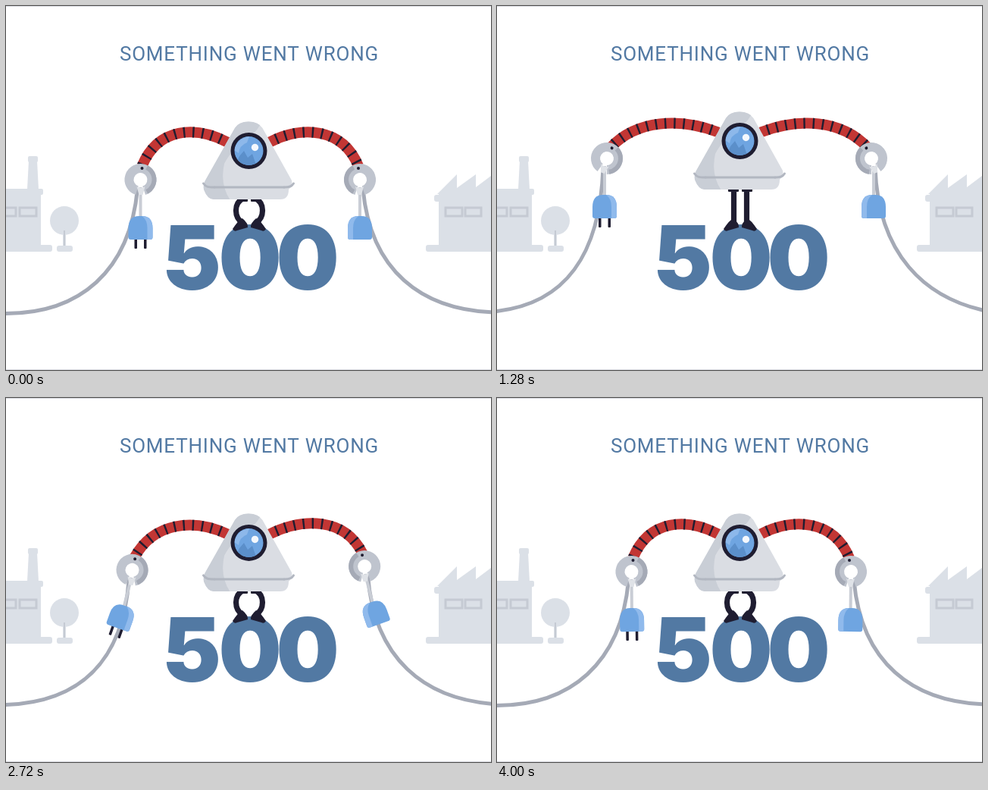
An HTML page with a canvas for the animation above (4080 ms loop, 640 by 480 pixels).

```html
<!DOCTYPE html>
<html lang="en">
<head>
<meta charset="utf-8">
<title>Something went wrong</title>
<style>
html, body { margin: 0; width: 100%; height: 100%; overflow: hidden; background: #fff; }
canvas { display: block; width: 640px; height: 480px; }
</style>
</head>
<body>
<canvas id="stage" width="640" height="480" role="img" aria-label="Something went wrong, 500"></canvas>
<script>
const ctx = document.getElementById('stage').getContext('2d');
const LOOP = 4080, STEP = 80;
const INK = '#1f1d31', BLUE = '#5279a3', RED = '#c23634', HAZE = '#dbe0e7';
const LIGHT = '#dadde3', SHADE = '#c9ced6', STEEL = '#bfc4ce', DEEP = '#a5aab6';
const PLUG = '#6fa5e1', PLUG_LIGHT = '#90baec';

const lerp = (a, b, p) => a + (b - a) * p;
const ease = u => (1 - Math.cos(Math.PI * u)) / 2;

// Eased value at time t from [time, value] pairs.
function track(t, keys) {
  for (let i = 1; i < keys.length; i++) {
    const [t0, a] = keys[i - 1], [t1, b] = keys[i];
    if (t < t1) return lerp(a, b, ease((t - t0) / (t1 - t0)));
  }
  return keys[keys.length - 1][1];
}

const pulse = (t, up, start, end) => track(t, [[0, 0], [up, 1], [start, 1], [end, 0]]);

const swing = t => track(t, [
  [0, 0], [480, -15], [640, -13], [960, 4], [1280, 0], [1520, -1.5], [1800, 0.5],
  [2080, 0], [2400, 6.5], [2640, 15], [2720, 14.5], [3100, -6], [3360, -2.8], [3620, 2], [4000, -0.6], [4080, 0]
]) * Math.PI / 180;

function fill(color, d) {
  ctx.fillStyle = color;
  ctx.fill(new Path2D(d));
}

function box(color, x, y, w, h, r = 0) {
  ctx.fillStyle = color;
  ctx.beginPath();
  ctx.roundRect(x, y, w, h, r);
  ctx.fill();
}

function disc(color, x, y, r) {
  ctx.fillStyle = color;
  ctx.beginPath();
  ctx.arc(x, y, r, 0, 7);
  ctx.fill();
}

function curve(color, width, p0, p1, p2, p3) {
  ctx.strokeStyle = color;
  ctx.lineWidth = width;
  ctx.beginPath();
  ctx.moveTo(...p0);
  ctx.bezierCurveTo(...p1, ...p2, ...p3);
  ctx.stroke();
}

function frameRect(x, y, w, h) {
  ctx.strokeStyle = '#c5cad3';
  ctx.lineWidth = 3;
  ctx.strokeRect(x, y, w, h);
}

function scenery() {
  box('#fff', 0, 0, 640, 480);
  box('#d9dbe1', 0, 0, 640, 1);
  box('#d9dbe1', 0, 479, 640, 1);

  box(HAZE, 29, 198, 13, 8, 2);
  fill(HAZE, 'M30 204H41L43 242H28Z');
  box(HAZE, -4, 241, 53, 8, 2);
  box(HAZE, 0, 245, 46, 78);
  box(HAZE, -4, 315, 65, 9, 3);
  frameRect(-6, 266, 19, 11);
  frameRect(18, 266, 22, 11);
  disc(HAZE, 77, 283, 19);
  box(HAZE, 75, 290, 4, 28);
  box(HAZE, 67, 316, 21, 8, 3);
  box('#c5cad3', 76, 296, 2, 20);

  fill(HAZE, 'M569 248L595 222V240L620 222V239L640 224V324H571V248Z');
  box(HAZE, 565, 249, 12, 9, 3);
  box(HAZE, 554, 315, 90, 9, 3);
  frameRect(580, 266, 22, 11);
  frameRect(606, 266, 21, 11);
}

function lettering() {
  ctx.fillStyle = BLUE;
  ctx.textAlign = 'center';
  ctx.font = '400 26px Roboto, sans-serif';
  ctx.letterSpacing = '0.8px';
  ctx.fillText('SOMETHING WENT WRONG', 321, 71.5);
  ctx.letterSpacing = '0px';
  ctx.font = '900 117px Inter, sans-serif';
  [...'500'].forEach((c, i) => ctx.fillText(c, 246 + i * 76, 373.5));
}

// side: -1 for the left arm, 1 for the right one.
function hand(side, x, y, p) {
  ctx.save();
  ctx.translate(x, y);
  ctx.scale(-side, 1);
  ctx.rotate(p * 0.32);
  ctx.lineCap = 'butt';
  ctx.lineWidth = 12;
  ctx.strokeStyle = STEEL;
  ctx.beginPath();
  ctx.arc(0, 0, 15, Math.PI * 0.6, Math.PI * 2.4);
  ctx.stroke();
  ctx.strokeStyle = DEEP;
  ctx.lineWidth = 6;
  ctx.beginPath();
  ctx.arc(0, 0, 18, -1.1, 1.1);
  ctx.stroke();
  fill('#dfe2e7', 'M-5 9L-2 20H3L6 9Q0 13 -5 9Z');
  disc(INK, 2, -15, 2);
  ctx.restore();
}

function plug(side, x, y, angle) {
  ctx.save();
  ctx.translate(x, y);
  ctx.rotate(angle);
  ctx.strokeStyle = '#c9cdd5';
  ctx.lineWidth = 4;
  ctx.beginPath();
  ctx.moveTo(0, 0);
  ctx.lineTo(0, 42);
  ctx.stroke();
  // The shell tips a little further than its cord.
  ctx.translate(0, 54);
  ctx.rotate(angle * 0.35);
  if (side < 0) {
    box(INK, -8, 12, 3.5, 15, 1);
    box(INK, 4.5, 12, 3.5, 15, 1);
  }
  ctx.scale(-side, 1);
  const shell = new Path2D('M-16 12V0Q-16 -16 -2 -16H2Q16 -16 16 0V12Q16 15 13 15H-13Q-16 15 -16 12Z');
  ctx.fillStyle = PLUG;
  ctx.fill(shell);
  ctx.clip(shell);
  fill(PLUG_LIGHT, 'M2 -16Q9 -11 9 0V15H17V-16Z');
  ctx.restore();
}

function cable(side, x, y, p) {
  const sx = x + side * lerp(4, 5, p), sy = y + 12;
  const left = side < 0;
  const bend = left ? lerp(98, 91, p) : lerp(548, 565, p);
  const sag = left ? lerp(407, 394, p) : lerp(401, 385, p);
  const end = left ? [-5, lerp(405.5, 403, p)] : [645, lerp(404, 402, p)];
  curve(DEEP, 5, [sx, sy], [sx + side * lerp(10, 4, p), sy + lerp(108, 115, p)], [bend, sag], end);
}

function arm(side, x, y, p, lift) {
  const a = [side < 0 ? 292 : 348, 179.5 - lift];
  const d = [x - side * lerp(2, 5.5, p), y - lerp(18, 15, p)];
  const b = [a[0] + side * lerp(42, 51, p), a[1] - lerp(22, 19.5, p)];
  const c = [d[0] - side * lerp(21, 34, p), d[1] - lerp(51, 36, p)];
  ctx.lineCap = 'butt';
  curve(RED, 14, a, b, c, d);
  ctx.setLineDash([2.4, 9.8]);
  ctx.lineDashOffset = -9;
  curve(INK, 14, a, b, c, d);
  ctx.setLineDash([]);
}

function limb(side, x, y, p, angle, lift) {
  cable(side, x, y, p);
  arm(side, x, y, p, lift);
  plug(side, x + side * 3 * p, y + 10, angle);
  hand(side, x, y, p);
}

function legs(lift, stand) {
  for (const side of [-1, 1]) {
    ctx.save();
    ctx.translate(321, 0);
    ctx.scale(side, 1);
    const out = 8.5 + 12 * (1 - stand), top = 254 - lift;
    ctx.lineCap = 'butt';
    curve(INK, 7.2, [8.5, top], [out, top + 6], [out, 279], [8.5, 286]);
    box(INK, 2, top, 14, 4, 1);
    fill(INK, 'M9 280Q14 282 22 294Q20 298 16 296L2 292Q1 287 9 280Z');
    ctx.restore();
  }
}

function body(lift) {
  ctx.save();
  ctx.translate(0, -lift);
  const hull = new Path2D('M302 161Q307 152.5 320 152.5Q333 152.5 338.5 161L377 230Q379 236 373 242Q373 255 362 255H274Q266 255 261 242Q260 235 263 230Z');
  ctx.fillStyle = LIGHT;
  ctx.fill(hull);
  ctx.save();
  ctx.clip(hull);
  fill(SHADE, 'M255 150H338Q334 163 322 172Q298 188 288 208Q282 236 296 256H255Z');
  ctx.restore();

  ctx.lineCap = 'round';
  curve('#b2b7c1', 3, [260.5, 234], [264, 239], [267, 239], [275, 239]);
  curve('#b2b7c1', 3, [275, 239], [305, 239], [335, 239], [367, 239]);
  curve('#b2b7c1', 3, [367, 239], [374, 239], [377, 238], [379.5, 234]);

  disc(INK, 320.5, 191, 24);
  disc(PLUG, 320.5, 191, 19);
  ctx.save();
  ctx.beginPath();
  ctx.arc(320.5, 191, 19, 0, 7);
  ctx.clip();
  fill('#5b8fca', 'M303 210L308 198L314 191L319 200L325 195L331 212Z');
  fill('#8db8ea', 'M301 190Q305 174 321 172L318 180Q308 184 307 194Z');
  ctx.restore();
  disc('#f4f8fd', 328.5, 186.5, 4.7);
  ctx.restore();
}

function draw(t) {
  const stand = pulse(t, 620, 2080, 2750), lift = 13 * stand;
  const lx = pulse(t, 860, 2060, 3150), ly = pulse(t, 900, 1980, 2880);
  const rx = pulse(t, 880, 1990, 3060), ry = pulse(t, 860, 2020, 3070);
  const angle = swing(t);
  scenery();
  lettering();
  limb(-1, lerp(177.5, 145, lx), lerp(229, 201, ly), lx, angle, lift);
  limb(1, lerp(467, 494, rx), lerp(229, 201, ry), rx, -angle, lift);
  legs(lift, stand);
  body(lift);
}

const start = performance.now();
function tick() {
  const t = (performance.now() - start) % LOOP;
  draw(Math.floor(t / STEP) * STEP);
  requestAnimationFrame(tick);
}
tick();
</script>
</body>
</html>
```
